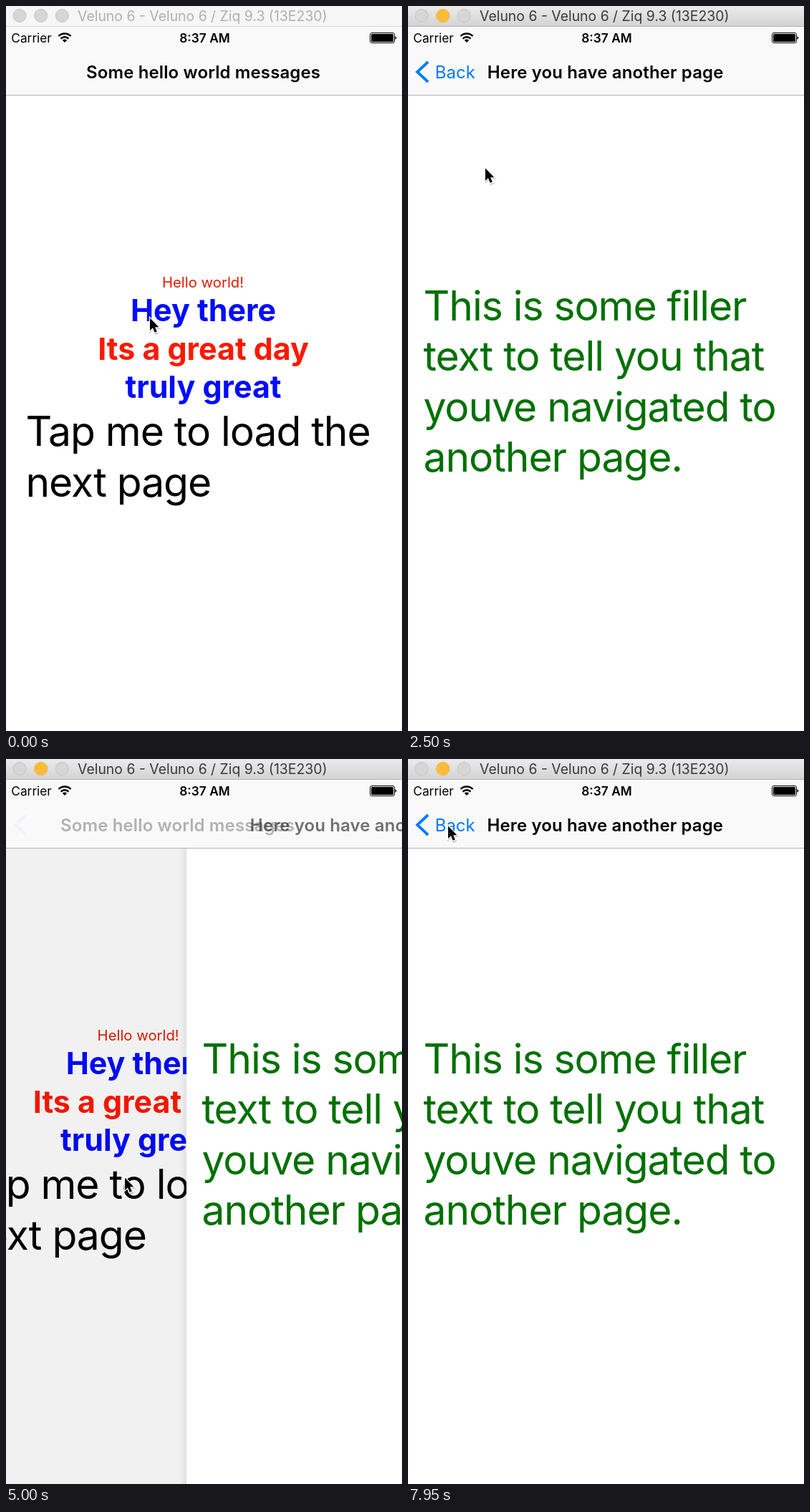
Recreate the animation shown at these times as an HTML page. Size 553 px wide and 1012 px high, loop 8 s.

```html
<!DOCTYPE html>
<html lang="en">
<head>
<meta charset="utf-8">
<title>Page navigation</title>
<style>
  html, body { margin: 0; width: 100%; height: 100%; overflow: hidden; background: #fff; }
  svg { display: block; width: 553px; height: 1012px; font-family: Inter, sans-serif; font-optical-sizing: none; }
  text { white-space: pre; }
  .large { font-size: 57px; letter-spacing: -.0185em; }
  .bold { font-size: 43px; font-weight: 700; letter-spacing: -.05px; text-anchor: middle; }
  .title { font-size: 24px; font-weight: 600; letter-spacing: .12px; }
  .status { font-size: 17.3px; }
</style>
</head>
<body>
<svg viewBox="0 0 553 1012">
  <defs>
    <linearGradient id="barFill" x2="0" y2="1">
      <stop stop-color="#ebebeb"/><stop offset="1" stop-color="#d3d3d3"/>
    </linearGradient>
    <linearGradient id="edgeFill">
      <stop stop-opacity="0"/><stop offset="1" stop-opacity=".09"/>
    </linearGradient>
  </defs>

  <g id="home">
    <text x="275" y="393" font-size="20.3" text-anchor="middle" fill="#e01c04">Hello world!</text>
    <text class="bold" x="275.5" y="440" fill="#000cff">Hey there</text>
    <text class="bold" x="275.5" y="493.5" fill="#ff1800">Its a great day</text>
    <text class="bold" x="275.5" y="546.5" fill="#000cff">truly great</text>
    <g class="large">
      <text x="27.5" y="614.2">Tap me to load the</text>
      <text x="27.5" y="684.6">next page</text>
    </g>
  </g>
  <rect id="dim" y="125" width="553" height="887"/>

  <g id="detail">
    <rect id="edge" x="-10" y="125" width="10" height="887" fill="url(#edgeFill)"/>
    <rect y="125" width="553" height="887" fill="#fff"/>
    <g class="large" fill="#007000">
      <text x="21.5" y="438.8">This is some filler</text>
      <text x="21.5" y="509.2">text to tell you that</text>
      <text x="21.5" y="579.6">youve navigated to</text>
      <text x="21.5" y="650">another page.</text>
    </g>
  </g>

  <rect y="29" width="553" height="95" fill="#f9f9f9"/>
  <rect y="124" width="553" height="1" fill="#b4b4b4"/>
  <text id="homeTitle" class="title" y="100.5">Some hello world messages</text>
  <text id="detailTitle" class="title" y="100.5">Here you have another page</text>
  <path id="chevron" d="M28 78L13 92L28 106" fill="none" stroke="#007aff" stroke-width="3.8"/>
  <text id="back" y="100.5" font-size="24" fill="#007aff">Back</text>

  <g class="status">
    <text x="7.3" y="51">Carrier</text>
    <text x="277.5" y="51" font-weight="600" text-anchor="middle">8:37 AM</text>
  </g>
  <g fill="none" stroke="#000" stroke-width="2.4">
    <path d="M73.5 42A12 12 0 0 1 90.5 42M76.6 45.6A7.5 7.5 0 0 1 87.4 45.6"/>
    <path d="M82 51L78.8 47.8A4.5 4.5 0 0 1 85.2 47.8Z" fill="#000" stroke="none"/>
    <rect x="508.5" y="37.5" width="34" height="14" rx="2.5" stroke-width="1"/>
    <rect x="510" y="39" width="31" height="11" rx="1.5" fill="#000" stroke="none"/>
    <path d="M543.5 42.2a2.4 2.4 0 0 1 0 4.6z" fill="#000" stroke="none"/>
  </g>

  <rect id="bar" width="553" height="28"/>
  <rect id="barLine" y="28" width="553" height="1"/>
  <g fill="#d6d6d6" stroke="#c4c4c4">
    <circle cx="19" cy="13.5" r="9"/>
    <circle id="minimize" cx="48.7" cy="13.5" r="9"/>
    <circle cx="78.3" cy="13.5" r="9"/>
  </g>
  <text id="windowTitle" x="100" y="20.5" font-size="19.4">Veluno 6 - Veluno 6 / Ziq 9.3 (13E230)</text>

  <g id="cursor">
    <path d="M1 2V21L5.5 17L8.5 24L12 22.5L9 16H14.5Z" opacity=".2" stroke="#000" stroke-width="2"/>
    <path d="M1 1.5V19L5 15.3L7.7 21.8L10.8 20.5L8.1 14.3H13.4Z" stroke="#fff" stroke-width="2.4" paint-order="stroke"/>
  </g>
</svg>

<script>
const LOOP = 8000, STEP = 50, WIDTH = 553, ACTIVATE = 600;
const el = id => document.getElementById(id);
const set = (id, attrs) => {
  for (const name in attrs) el(id).setAttribute(name, attrs[name]);
};

const transitions = [
  { start: 1970, push: true },
  { start: 3450, push: false },
  { start: 4900, push: true }
];

// time, x, y of the pointer tip
const pointer = [
  [0, 200, 434], [50, 200, 434], [700, 127, 643], [2100, 127, 643],
  [2500, 107, 225], [3050, 55, 92], [3500, 55, 92], [3650, 55, 133],
  [4500, 165, 583], [5050, 165, 583], [5700, 239, 483],
  [6600, 239, 483], [7400, 55, 92], [8000, 55, 92]
];

// Critically damped spring, stiffness 1000 and mass 3
function spring(ms) {
  const k = Math.sqrt(1000 / 3) * Math.max(0, ms) / 1000;
  return 1 - (1 + k) * Math.exp(-k);
}

function pointerAt(t) {
  const i = pointer.findIndex(key => key[0] > t);
  const [t0, x0, y0] = pointer[i - 1], [t1, x1, y1] = pointer[i];
  const u = (t - t0) / (t1 - t0), e = u * u * (3 - 2 * u);
  return [x0 + (x1 - x0) * e, y0 + (y1 - y0) * e];
}

function drawPages(t) {
  const current = transitions.filter(item => item.start <= t).pop() || { start: t, push: true };
  const { push } = current, age = t - current.start;
  const shown = push ? spring(age) : 1 - spring(age);
  const label = push ? shown : 1 - spring(age - STEP);
  const hidden = 1 - shown;

  set('home', { transform: `translate(${-0.3 * WIDTH * shown})` });
  set('dim', { opacity: 0.1 * shown });
  set('detail', { transform: `translate(${Math.round(WIDTH * hidden)})` });
  set('edge', { opacity: Math.min(1, shown * 1.3) });

  set('homeTitle', { x: 112 - 66 * shown, opacity: hidden ** (push ? 1.6 : 14) });
  set('detailTitle', { x: 110.5 + 506 * (1 - label), opacity: shown });
  set('back', {
    x: 37.7 + 209 * (1 - label),
    opacity: push ? Math.max(0, Math.min(1, (shown - 0.54) / 0.25)) : shown ** 1.4
  });
  set('chevron', { opacity: shown ** (push ? 5 : 1.7) });
}

function drawWindow(active) {
  set('bar', { fill: active ? 'url(#barFill)' : '#f6f6f6' });
  set('barLine', { fill: active ? '#b3b3b3' : '#d8d8d8' });
  set('minimize', { fill: active ? '#ffbd37' : '#d6d6d6', stroke: active ? '#f0ae36' : '#c4c4c4' });
  set('windowTitle', { fill: active ? '#3a3a3a' : '#b0b0b0' });
}

function draw(now) {
  const t = Math.floor(now % LOOP / STEP) * STEP;
  drawPages(t);
  drawWindow(t >= ACTIVATE);
  set('cursor', { transform: `translate(${pointerAt(t)})` });
  requestAnimationFrame(draw);
}
draw(0);
</script>
</body>
</html>
```
